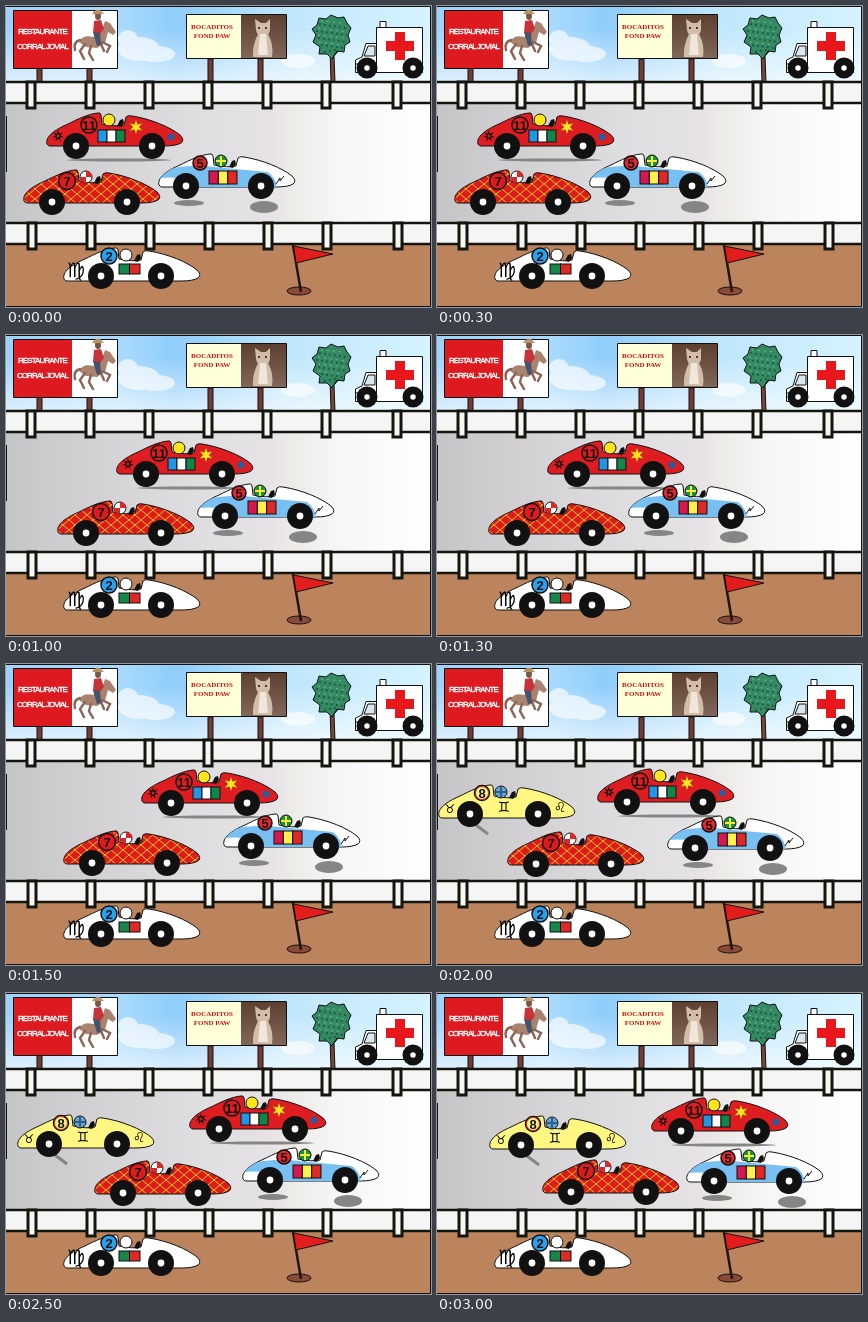
Recreate the animation shown at these times as an HTML page. Size 425 by 301 pixels, loop 3.5 s.

```html
<!DOCTYPE html>
<html lang="es">
<head>
<meta charset="utf-8">
<title>Carrera</title>
<style>
html, body { margin: 0; width: 100%; height: 100%; overflow: hidden; background: #fff; }
svg { display: block; width: 100vw; height: 100vh; }
text { text-anchor: middle; }
.ink { stroke: #111; stroke-width: 1; }
.sign { font: 8px "Liberation Sans", Arial, sans-serif; letter-spacing: -.9px; fill: #fff; stroke: #fff; stroke-width: .4; }
.food { font: bold 7px "Liberation Serif", Times, serif; fill: #d01010; }
.num { font: bold 13px "Liberation Sans", Arial, sans-serif; }
.zodiac { font: bold 14px "DejaVu Sans", sans-serif; }
.car { animation: 3.5s step-end infinite; }
</style>
</head>
<body>
<svg viewBox="0 0 425 301" preserveAspectRatio="none">
  <defs>
    <linearGradient id="sky">
      <stop offset="0" stop-color="#9fd2fb"/><stop offset=".27" stop-color="#a9dafd"/>
      <stop offset=".4" stop-color="#8fcdfb"/><stop offset=".65" stop-color="#bfe6fd"/>
      <stop offset="1" stop-color="#d5f3ff"/>
    </linearGradient>
    <linearGradient id="haze" x2="0" y2="1">
      <stop offset=".3" stop-color="#fff" stop-opacity="0"/><stop offset="1" stop-color="#fff" stop-opacity=".65"/>
    </linearGradient>
    <linearGradient id="road">
      <stop offset="0" stop-color="#c5c5c7"/><stop offset=".2" stop-color="#d2d0d3"/>
      <stop offset=".45" stop-color="#dedee0"/><stop offset=".62" stop-color="#e6e2e6"/>
      <stop offset=".68" stop-color="#eeece8"/><stop offset=".78" stop-color="#f6f6f8"/>
      <stop offset="1" stop-color="#fff"/>
    </linearGradient>
    <linearGradient id="fur" x2="0" y2="1">
      <stop offset="0" stop-color="#5d4030"/><stop offset="1" stop-color="#80675a"/>
    </linearGradient>
    <pattern id="lattice" width="12" height="10" patternUnits="userSpaceOnUse">
      <path fill="#dc1c1c" d="M0 0h12v10H0z"/>
      <path fill="none" stroke="#f4c020" d="M0 0 12 10M12 0 0 10"/>
    </pattern>
    <path id="shell" d="M1 32C-1 25 8 18 22 12C32 7 42 2 52 1Q54 0 55 3L56 12Q70 15 78 13L80 5Q82 3 86 4C105 7 124 15 134 23Q139 28 135 31Q130 34 118 34H4Q2 34 1 32Z"/>
    <clipPath id="hull"><use href="#shell"/></clipPath>
  </defs>

  <path fill="url(#sky)" d="M0 0h425v76H0z"/>
  <path fill="url(#haze)" d="M0 0h425v76H0z"/>
  <g fill="#fff" opacity=".65">
    <ellipse cx="133" cy="43" rx="21" ry="12"/><ellipse cx="122" cy="33" rx="10" ry="9"/>
    <ellipse cx="150" cy="48" rx="19" ry="8"/><ellipse cx="292" cy="55" rx="17" ry="7"/>
  </g>

  <g fill="#743c34" class="ink">
    <path d="M31 62h5v14h-5zM81 62h5v14h-5zM202 53h5v23h-5zM252 53h5v23h-5z"/>
  </g>
  <path class="ink" fill="#fff" d="M7.500 4.500h104v58h-104z"/>
  <path fill="#dd1a20" d="M8 5h58v57H8z"/>
  <text class="sign" x="36.500" y="28">RESTAURANTE</text>
  <text class="sign" x="36.500" y="43">CORRAL JOVIAL</text>
  <g stroke-linecap="round">
    <path fill="#a98370" d="M73 36Q77 28 87 31L96 24 99 15 104 17 110 26 107 29 102 26 99 37 91 42 80 41Z"/>
    <path fill="none" stroke="#8c6658" stroke-width="2.500" d="M79 38 74 45 78 53M85 40 83 47 87 54M96 36 104 40 101 46M95 38 98 45M74 34Q67 36 69 44"/>
    <path fill="#c83338" d="M88 15 95 14 98 23 94 28 87 27Z"/>
    <path fill="#46536e" d="M87 26 94 27 95 39 91 40Z"/>
    <ellipse cx="92" cy="10" rx="3" ry="4" fill="#78564a"/>
    <path fill="#b89368" d="M86 8Q89 3 94 4L98 8Z"/>
  </g>

  <path class="ink" fill="#ffffd9" stroke-width="1.500" d="M180.500 8.500h100v44h-100z"/>
  <path fill="url(#fur)" d="M235 9h45v43h-45z"/>
  <text class="food" x="206" y="23">BOCADITOS</text>
  <text class="food" x="206" y="32">FOND PAW</text>
  <g fill="#d2bda9">
    <path d="M250 24 249 13 255 17 260 17 264 13 264 24Q263 30 257 30T250 24Z"/>
    <path d="M252 28H262Q268 39 266 51H247Q246 40 252 28Z"/>
    <path fill="#f0e6db" d="M254 28h6l2 21h-10z"/>
    <path fill="#4e392d" d="M252 21h2v2h-2zM259 21h2v2h-2z"/>
  </g>

  <path class="ink" fill="#77483a" d="M324 44 325 76H329L328 50 335 42 332 41 327 47Z"/>
  <path class="ink" fill="#348b63" d="M313 12 320 13 325 9 332 12 338 11 341 17 345 22 342 29 344 36 339 39 338 46 331 45 326 53 321 48 313 48 314 41 307 36 310 29 306 23 311 19Z"/>
  <path fill="none" stroke="#1c5d43" stroke-width="2" stroke-dasharray="2 3" d="M313 18 340 22M310 25 342 29M312 32 341 36M315 39 337 42M318 46 330 44"/>
  <path fill="none" stroke="#70bd91" stroke-dasharray="2 4" d="M315 15 337 17M312 22 339 26M312 29 339 32M313 36 336 39"/>

  <g class="ink">
    <path fill="#fff" d="M370.500 21.500H416.500V66.500H349.500V54L356 51 360 37.500H370.500Z"/>
    <path fill="#d7e8ee" d="M358 50 362 40H369V50Z"/>
    <path fill="#fff" d="M374 21V15.500h6V21"/>
    <path fill="none" d="M370.500 37V66M350 58h5"/>
  </g>
  <path fill="#e8171c" d="M389 26h10v9h9v10h-9v9h-10v-9h-9V35h9z"/>
  <g id="tyres"></g>

  <path fill="url(#road)" d="M0 76h425v162H0z"/>
  <path fill="#bc845c" d="M0 238h425v63H0z"/>
  <path stroke="#111" d="M.5 110V166"/>
  <g id="back"></g>
  <g id="race"></g>
  <g id="front"></g>
  <g id="parked"></g>

  <ellipse class="ink" cx="293" cy="285" rx="12" ry="4" fill="#8b4938"/>
  <path stroke="#20160f" stroke-width="2.500" d="M287 239 295 286"/>
  <path class="ink" fill="#e31c1c" d="M287.500 240 327 248 290 257Z"/>
  <path fill="none" stroke="#111" d="M0 .5H424.500V300.500H0"/>
</svg>

<script>
const $ = id => document.getElementById(id);
const circle = (x, y, r, fill, more = '') => `<circle cx="${x}" cy="${y}" r="${r}" fill="${fill}" ${more}/>`;
const ellipse = (x, y, rx, ry) => `<ellipse cx="${x}" cy="${y}" rx="${rx}" ry="${ry}" fill="#858585"/>`;
const wheel = (x, y, r) => circle(x, y, r, '#111') + circle(x, y, r * .26, '#fff');
const glyph = (x, y, s, size = 14) => `<text class="zodiac" x="${x}" y="${y}" style="font-size:${size}px">${s}&#xFE0E;</text>`;
const line = (d, color = '#111', w = 1) => `<path d="${d}" fill="none" stroke="${color}" stroke-width="${w}"/>`;

function flag(x, y, w, h, colors) {
  const step = w / colors.length;
  return colors.map((c, i) =>
    `<rect class="ink" x="${x + i * step}" y="${y}" width="${step}" height="${h}" fill="${c}"/>`).join('');
}

function rail(y, shift) {
  const posts = [25, 84, 143, 202, 261, 320, 391].map(x =>
    `<rect x="${x + shift - 4}" y="${y}" width="8" height="26" fill="#f7f7f2" stroke="#151510" stroke-width="3"/>`).join('');
  return `<path d="M0 ${y}h425v21H0z" fill="#f5f5f5"/>` +
    line(`M0 ${y}h425M0 ${y + 21}h425`, '#151510', 2.5) + posts;
}

function car(c) {
  return (c.shadow || '') +
    `<use href="#shell" class="ink" fill="${c.paint}"/><g clip-path="url(#hull)">${c.stripe || ''}</g>` +
    circle(63, 8, 6, c.helmet, 'class="ink"') + (c.crest || '') +
    '<path d="M71 14 74 8 77 7 78 11 75 15Z" fill="#111"/>' +
    circle(c.disc[0], c.disc[1], c.disc[2], c.disc[3], 'class="ink" style="stroke-width:1.5"') +
    `<text class="num" x="${c.disc[0]}" y="${c.disc[1] + 4.5}" fill="${c.ink || '#111'}">${c.no}</text>` +
    c.trim + wheel(c.wheels[0], c.wheels[2], 13) + wheel(c.wheels[1], c.wheels[2], 13);
}

const cross = color => line('M63 3V13M58 8H68', color, 2);
const burst = (x, y, r, n) => Array.from({ length: n * 2 }, (_, i) => {
  const a = i * Math.PI / n, d = i % 2 ? r * .4 : r;
  return [x + d * Math.sin(a), y - d * Math.cos(a)].map(v => v.toFixed(1));
}).join(' ');

// Each car: one place per half second; null keeps it off the track.
const racers = [
  {
    path: [[40, 106], [71, 106], [110, 105], [135, 105], [160, 104], [183, 102], [214, 104]],
    paint: '#df1d20', helmet: '#ffe51c', no: 11, disc: [43, 13, 8, '#df1d20'], wheels: [30, 106, 34],
    shadow: ellipse(73, 48, 52, 1.5),
    trim: flag(52, 18, 27, 12, ['#2096e5', '#fff', '#128548']) +
      `<polygon points="${burst(90, 15, 8, 6)}" fill="#ffe51c" stroke="#a32010" stroke-width=".5"/>` +
      `<polygon points="${burst(12, 24, 6, 7)}" fill="#111"/>` + circle(12, 24, 1.5, '#df1d20') +
      circle(125, 25, 3.5, '#285c9c')
  },
  {
    path: [null, null, null, null, [1, 120], [11, 121], [52, 122]],
    paint: '#fff782', helmet: '#62a5d4', no: 8, disc: [44, 9, 7.5, '#fff782'], wheels: [32, 100, 30],
    crest: cross('#315f87'), shadow: line('M34 38 50 50', '#858585', 3),
    trim: circle(44, 9, 6.5, 'none', 'stroke="#d72320"') +
      glyph(12, 29, '♉', 12) + glyph(66, 28, '♊') + glyph(122, 28, '♌')
  },
  {
    path: [[152, 147], [171, 147], [191, 148], [217, 149], [230, 151], [236, 154], [249, 155]],
    paint: '#fff', helmet: '#159546', no: 5, disc: [42, 10, 7, '#e3272a'], wheels: [28, 103, 33],
    crest: cross('#ffe832'), shadow: ellipse(31, 50, 15, 3) + ellipse(106, 54, 14, 6),
    stripe: '<path d="M0 19Q28 10 56 14L110 19Q118 25 119 35H38Q32 22 0 25Z" fill="#78bff2"/>',
    trim: flag(51, 18, 28, 13, ['#d61850', '#fff04a', '#df2925']) + line('M118 31 122 25 122 28 126 23')
  },
  {
    path: [[17, 163], [39, 164], [51, 165], [57, 166], [70, 167], [88, 167], [105, 166]],
    paint: 'url(#lattice)', helmet: '#fff', no: 7, disc: [44, 12, 8.5, '#dc1c1c'], wheels: [29, 104, 33],
    crest: '<path d="M63 8V2A6 6 0 0 1 69 8ZM63 8V14A6 6 0 0 1 57 8Z" fill="#e22525"/>',
    trim: ''
  }
];

const parked = {
  paint: '#fff', helmet: '#fff', no: 2, disc: [46, 9, 8, '#2aa1ef'], wheels: [38, 98, 29],
  trim: flag(56, 17, 21, 10, ['#16864b', '#df2925']) + glyph(13, 30, '♍', 20)
};

$('tyres').innerHTML = wheel(361, 62, 10.5) + wheel(407, 62, 10.5);
$('back').innerHTML = rail(76, 0);
$('front').innerHTML = rail(217, 1);
$('parked').innerHTML = `<g transform="translate(57 241)">${car(parked)}</g>`;
$('race').innerHTML = racers.map((c, i) =>
  `<g class="car" style="animation-name:run${i}">${car(c)}</g>`).join('');

const pose = p => p
  ? `transform:translate(${p[0]}px,${p[1]}px);visibility:visible`
  : 'transform:translate(-150px,120px);visibility:hidden';
const rules = document.createElement('style');
rules.textContent = racers.map(({ path }, i) => `@keyframes run${i}{` +
  path.map((p, k) => `${(k * 100 / path.length).toFixed(4)}%{${pose(p)}}`).join('') +
  `100%{${pose(path[path.length - 1])}}}`).join('\n');
document.head.append(rules);
</script>
</body>
</html>
```
